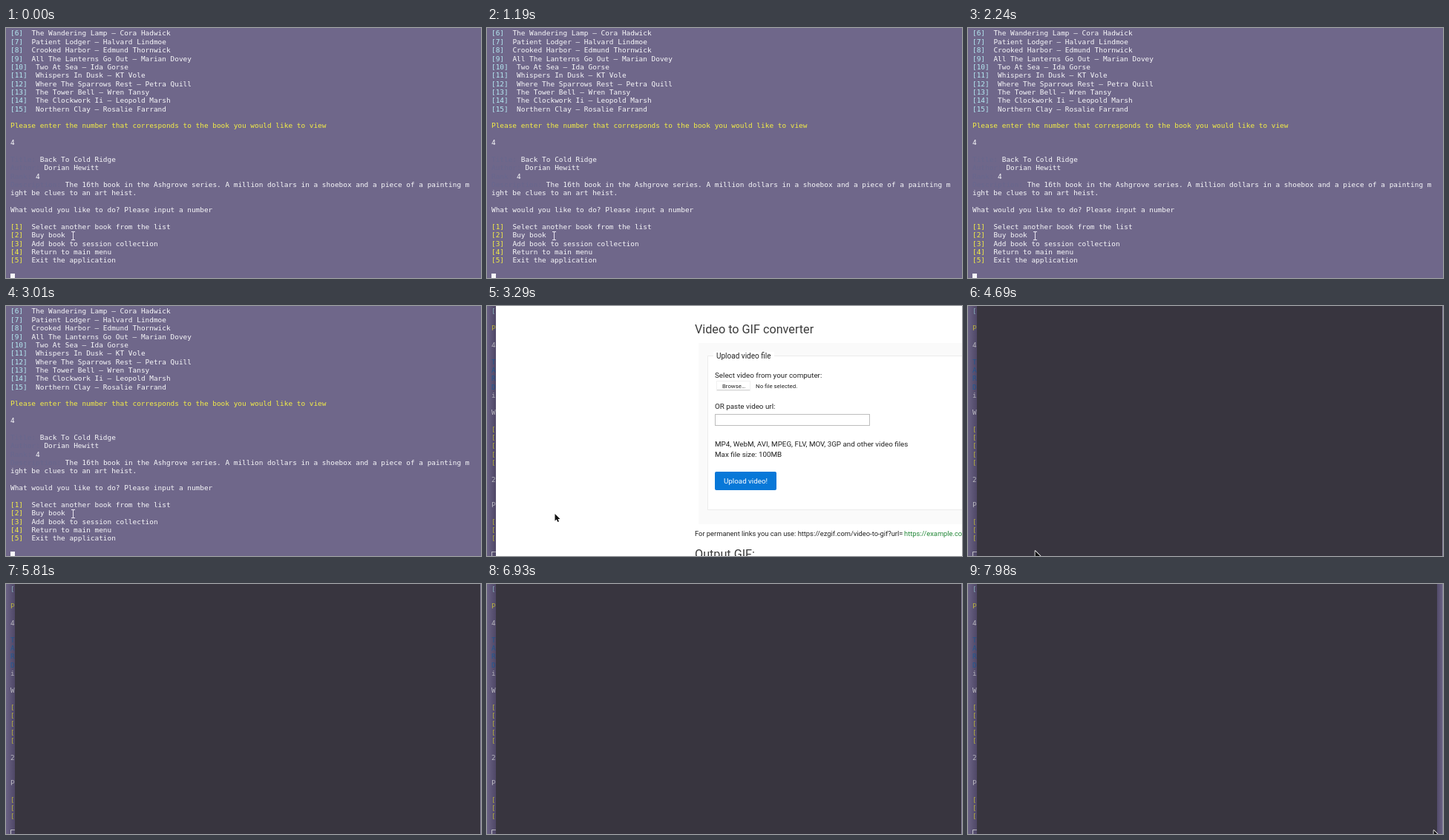
Write an HTML page with a canvas that moves like this. It is 640 by 338 pixels and loops after 8 s.

```html
<!DOCTYPE html>
<html lang="en">
<head>
<meta charset="utf-8">
<title>Book list terminal</title>
<style>
html, body { margin: 0; width: 100%; height: 100%; overflow: hidden; background: #6f678a; }
canvas { display: block; }
</style>
</head>
<body>
<canvas id="stage" width="640" height="338"></canvas>
<script>
const ctx = document.getElementById('stage').getContext('2d');
const LOOP = 8000, STEP = 70, BROWSER = 3290, DARK = 3570;
const CHAR = 5.68, LINE = 11.37, LEFT = 6;
const MONO = '9.43px "DejaVu Sans Mono", monospace';
const WHITE = '#f8f8fa', YELLOW = '#f4ee45', CYAN = '#b4eaf2', BLUE = '#2470b4';
const PURPLE = '#6f678a', SLATE = '#38353f';

const books = [
  'The Wandering Lamp – Cora Hadwick',
  'Patient Lodger – Halvard Lindmoe',
  'Crooked Harbor – Edmund Thornwick',
  'All The Lanterns Go Out – Marian Dovey',
  'Two At Sea – Ida Gorse',
  'Whispers In Dusk – KT Vole',
  'Where The Sparrows Rest – Petra Quill',
  'The Tower Bell – Wren Tansy',
  'The Clockwork Ii – Leopold Marsh',
  'Northern Clay – Rosalie Farrand'
];
const details = [
  ['Title:', 'Back To Cold Ridge'],
  ['Author:', 'Dorian Hewitt'],
  ['Rank:', '4'],
  ['Description:', 'The 16th book in the Ashgrove series. A million dollars in a shoebox and a piece of a painting m']
];
const choices = [
  'Select another book from the list',
  'Buy book',
  'Add book to session collection',
  'Return to main menu',
  'Exit the application'
];

function box(x, y, w, h, color) {
  ctx.fillStyle = color;
  ctx.fillRect(x, y, w, h);
}

function text(str, x, y, color, font) {
  ctx.font = font;
  ctx.fillStyle = color;
  ctx.fillText(str, x, y);
}

function term(row, col, str, color = WHITE) {
  text(str, LEFT + col * CHAR, 10.4 + row * LINE, color, MONO);
}

function item(row, n, str, color) {
  const tag = `[${n}]`;
  term(row, 0, tag, color);
  term(row, tag.length + 2, str);
}

function terminal(scrolled) {
  box(0, 0, 640, 338, PURPLE);
  const top = scrolled ? -9 : 0;
  books.forEach((b, i) => item(top + i, i + 6, b, CYAN));
  term(top + 11, 0, 'Please enter the number that corresponds to the book you would like to view', YELLOW);
  term(top + 13, 0, '4');
  details.forEach(([label, value], i) => {
    // The dark labels barely stand out until the text has scrolled.
    ctx.globalAlpha = scrolled ? 1 : 0.1;
    term(top + 15 + i, 0, label, BLUE);
    ctx.globalAlpha = 1;
    term(top + 15 + i, label.length + 1, value);
  });
  term(top + 19, 0, 'ight be clues to an art heist.');
  term(top + 21, 0, 'What would you like to do? Please input a number');
  choices.forEach((c, i) => item(top + 23 + i, i + 1, c, YELLOW));
  if (!scrolled) {
    box(6, 332, 6, 6, WHITE);
    return;
  }
  term(20, 0, '2');
  term(23, 0, 'P');
  for (let row = 25; row < 28; row++) term(row, 0, '[', YELLOW);
  ctx.strokeStyle = WHITE;
  ctx.lineWidth = 1;
  ctx.strokeRect(6.5, 332.5, 6, 8);
}

function shadow(x0, x1, from, to) {
  const g = ctx.createLinearGradient(x0, 0, x1, 0);
  g.addColorStop(0, `rgba(30,24,48,${from})`);
  g.addColorStop(1, `rgba(30,24,48,${to})`);
  box(x0, 0, x1 - x0, 338, g);
}

function page() {
  const ui = (str, x, y, size = 9.82, color = '#222') =>
    text(str, x, y, color, `${size}px Roboto, sans-serif`);
  const frame = (x, y, w, h, color) => {
    ctx.strokeStyle = color;
    ctx.lineWidth = 1;
    ctx.strokeRect(x + 0.5, y + 0.5, w - 1, h - 1);
  };
  box(12, 0, 628, 338, '#fff');
  ui('Video to GIF converter', 280, 37, 16.2, '#3c3c3c');
  box(285, 50, 355, 245, '#fafafa');
  box(297, 67, 343, 209, '#fff');
  frame(297, 67, 350, 209, '#ececec');
  box(305, 62, 82, 12, '#fff');
  ui('Upload video file', 309, 71, 10);
  ui('Select video from your computer:', 307, 97);
  frame(309, 101, 46, 14, '#f0f0f0');
  box(310, 113, 44, 1, '#d4d4d4');
  ui('Browse…', 317, 111, 7.8);
  ui('No file selected.', 362, 111, 7.9);
  ui('OR paste video url:', 307, 138.5);
  frame(307, 146, 209, 16, '#bdbdbd');
  ui('MP4, WebM, AVI, MPEG, FLV, MOV, 3GP and other video files', 307, 190);
  ui('Max file size: 100MB', 307, 203.5);
  ctx.fillStyle = '#0878d8';
  ctx.beginPath();
  ctx.roundRect(307, 224, 83, 25, 2);
  ctx.fill();
  ui('Upload video!', 319, 240, 9.8, '#fff');
  ui('For permanent links you can use: https://ezgif.com/video-to-gif?url=', 280, 310.5, 9.34);
  ui('https://example.com', 562, 310.5, 9.34, '#238838');
  ui('Output GIF:', 280, 341, 16.2, '#3c3c3c');
}

function beam(x, y) {
  ctx.lineWidth = 1;
  ctx.strokeStyle = '#e6e2ee';
  ctx.beginPath();
  ctx.moveTo(x - 2, y - 5.5);
  ctx.lineTo(x + 3, y - 5.5);
  ctx.moveTo(x + 0.5, y - 5);
  ctx.lineTo(x + 0.5, y + 5);
  ctx.moveTo(x - 2, y + 5.5);
  ctx.lineTo(x + 3, y + 5.5);
  ctx.stroke();
}

function arrow(x, y) {
  const path = [[0, 0], [0, 9.6], [2.2, 7.6], [3.8, 11], [5.5, 10.2], [4, 7], [7, 7]];
  ctx.beginPath();
  path.forEach(([dx, dy]) => ctx.lineTo(x + dx, y + dy));
  ctx.closePath();
  ctx.lineJoin = 'round';
  ctx.lineWidth = 1.6;
  ctx.strokeStyle = '#fff';
  ctx.stroke();
  ctx.fillStyle = '#111';
  ctx.fill();
}

function ease(t, start, end) {
  const p = Math.min(1, Math.max(0, (t - start) / (end - start)));
  return p * p * (3 - 2 * p);
}

function draw(t) {
  terminal(t >= BROWSER);
  if (t < BROWSER) {
    beam(90, 281);
    return;
  }
  shadow(0, 12, 0.06, 0.4);
  if (t < DARK) {
    page();
    arrow(91.5, 281);
    return;
  }
  const right = 639 - 7 * ease(t, 7770, 7980);
  box(12, 0, right - 12, 338, SLATE);
  shadow(right, 640, 0.35, 0.05);
  box(639, 0, 1, 338, '#85809a');
  const leave = ease(t, 4480, 4760), enter = ease(t, 7630, 7910);
  if (leave < 1) arrow(90.5, 280.5 + 60 * leave);
  if (enter > 0) arrow(627.5, 342 - 9 * enter);
}

function tick(now) {
  const t = now % LOOP;
  draw(Math.floor(t / STEP) * STEP);
  requestAnimationFrame(tick);
}
tick(performance.now());
</script>
</body>
</html>
```
